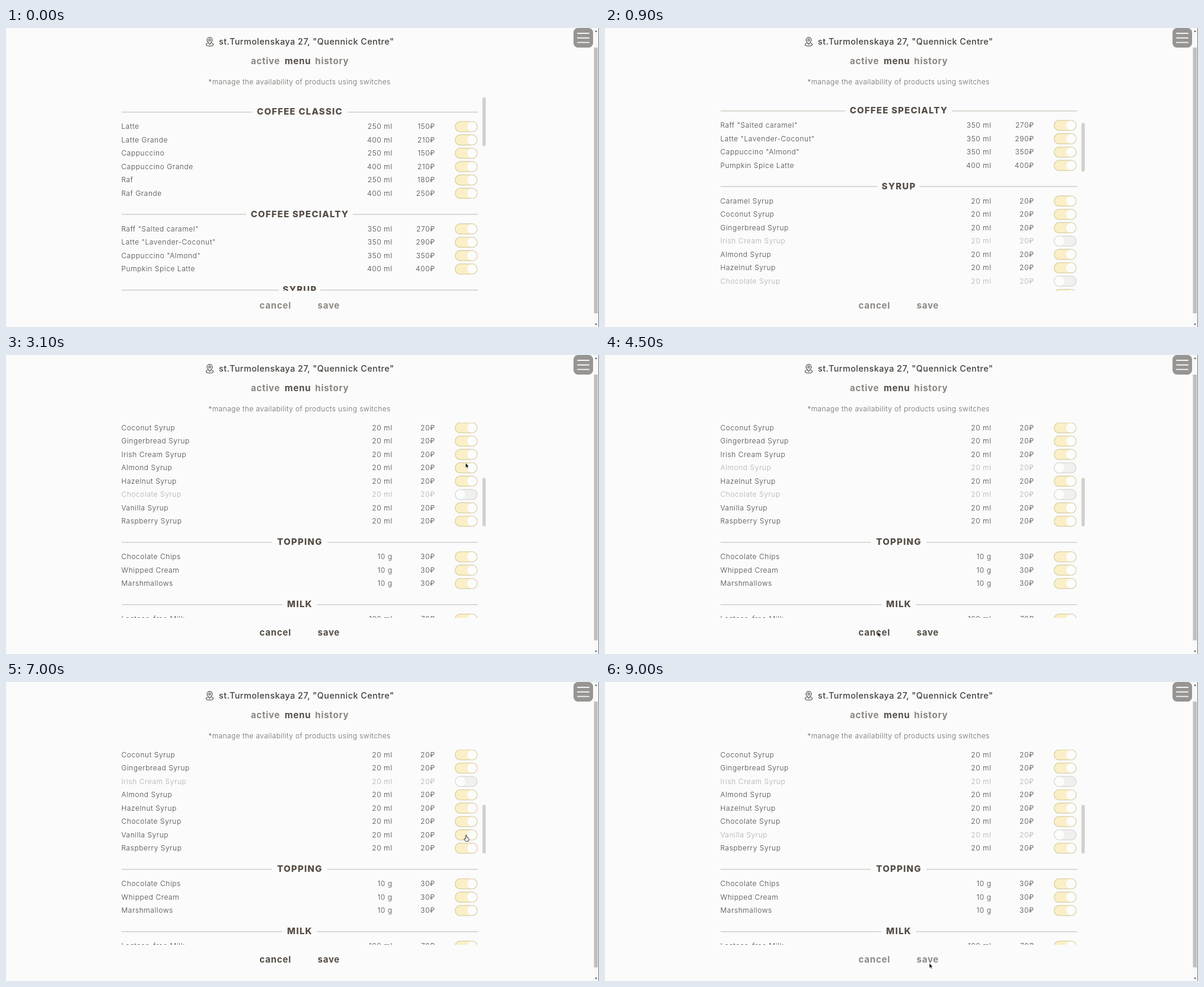
These frames come from a looping animation (1000 px wide and 504 px high, 9.3 s). An HTML page:

```html
<!DOCTYPE html>
<html lang="en">
<head>
<meta charset="utf-8">
<title>Menu availability</title>
<style>
  html, body { margin: 0; width: 100%; height: 100%; overflow: hidden; background: #fafbfa; }
  svg { display: block; width: 100vw; height: 100vh; }
  text { font-family: Inter, "Open Sans", sans-serif; fill: #4b4744; white-space: pre; }
  .row text { font-size: 12px; font-weight: 300; letter-spacing: .56px; }
  .head { font-size: 15px; font-weight: 800; letter-spacing: 1.2px; fill: #564d46; }
  .tab { font-size: 15px; font-weight: 700; letter-spacing: .75px; fill: #554d47; }
  .place { font-size: 14.3px; font-weight: 500; letter-spacing: .5px; fill: #45403c; }
  .note { font-size: 12px; font-weight: 300; letter-spacing: .41px; fill: #6f6a66; }
  .mid { text-anchor: middle; }
  .end { text-anchor: end; }
</style>
</head>
<body>
<svg viewBox="0 0 1000 504" xmlns="http://www.w3.org/2000/svg">
  <defs><clipPath id="view"><rect x="190" y="114" width="612" height="329"/></clipPath></defs>
  <rect width="1000" height="504" fill="#fafbfa"/>

  <g fill="none" stroke="#55504b" stroke-width="1.2" stroke-linejoin="round" stroke-linecap="round">
    <path d="M343.5 27.5C341 24.6 339 22.5 339 20.3a4.5 4.5 0 0 1 9 0C348 22.5 346 24.6 343.5 27.5Z"/>
    <circle cx="343.5" cy="20.3" r="1.7"/>
    <path d="M340 25.5C336 26.8 336.4 30.3 343.5 30.3S351 26.8 347 25.5"/>
  </g>
  <text class="place" x="359" y="27.7">st.Turmolenskaya 27, "Quennick Centre"</text>
  <text class="tab mid" x="437.6" y="60.7" fill-opacity=".68">active</text>
  <text class="tab mid" x="492.2" y="60.7">menu</text>
  <text class="tab mid" x="549.8" y="60.7" fill-opacity=".68">history</text>
  <text class="note mid" x="495" y="95">*manage the availability of products using switches</text>

  <g clip-path="url(#view)"><g id="list"></g></g>
  <rect id="thumb" x="803.5" width="5.5" height="82" rx="2.7" fill="#d2cfcc"/>

  <g id="buttons">
    <text class="tab mid" x="454.3" y="473.3">cancel</text>
    <text class="tab mid" x="544.3" y="473.3">save</text>
  </g>

  <rect x="957" y="0" width="33" height="33" rx="7.5" fill="#979593"/>
  <path d="M964 9H983M964 16.7H983M964 24.4H983" stroke="#f4f3f2" stroke-width="1.9" stroke-linecap="round"/>

  <rect x="991" width="9" height="504" fill="#f8f8f8"/>
  <rect x="991.5" y="33" width="6.5" height="448" fill="#c0c0c0"/>
  <path d="M999.5 0V504" stroke="#777"/>
  <path d="M993 6.500L995 4L997 6.500ZM993 498.500L995 501L997 498.500Z" fill="#444"/>

  <g id="cursor" stroke-linejoin="round">
    <path id="arrow" d="M0 0V8.200L1.900 6.500L3.200 9.300L4.500 8.700L3.300 6H5.700Z" fill="#111" stroke="#fff" stroke-width=".5"/>
    <path id="hand" d="M-.9 .5Q0 -.6 .9 .5V4L3.500 4.600Q4.600 5 4.400 6.400L3.600 10.500H-1L-3.400 7Q-3.800 5.800 -2.600 5.800L-.9 7Z" fill="#fff" stroke="#222" stroke-width=".9"/>
  </g>
</svg>
<script>
const LOOP = 9300, STEP = 100;
const $ = id => document.getElementById(id);
const clamp = v => Math.max(0, Math.min(1, v));
const mix = (a, b, u) => a + (b - a) * u;

// title, half width of the gap in the rule, rows of [name, amount, price]
const sections = [
  ["COFFEE CLASSIC", 81, [
    ["Latte", "250 ml", 150], ["Latte Grande", "400 ml", 210],
    ["Cappuccino", "250 ml", 150], ["Cappuccino Grande", "400 ml", 210],
    ["Raf", "250 ml", 180], ["Raf Grande", "400 ml", 250]]],
  ["COFFEE SPECIALTY", 90, [
    ['Raff "Salted caramel"', "350 ml", 270], ['Latte "Lavender-Coconut"', "350 ml", 290],
    ['Cappuccino "Almond"', "350 ml", 350], ["Pumpkin Spice Latte", "400 ml", 400]]],
  ["SYRUP", 35, ["Caramel", "Coconut", "Gingerbread", "Irish Cream", "Almond",
    "Hazelnut", "Chocolate", "Vanilla", "Raspberry"].map(n => [n + " Syrup", "20 ml", 20])],
  ["TOPPING", 47, ["Chocolate Chips", "Whipped Cream", "Marshmallows"].map(n => [n, "10 g", 30])],
  ["MILK", 29, [["Lactose-free Milk", "100 ml", 70]]]
];

// initial state, then the times at which it flips
const flips = {
  "Irish Cream Syrup": [0, 2800, 5200],
  "Almond Syrup": [1, 3400, 5200],
  "Chocolate Syrup": [0, 6600],
  "Vanilla Syrup": [1, 7400]
};
const unsaved = [0, 2800, 5200, 6600, 8700];

// start, end, target x, y, optional bend as fractions of the way
const moves = [
  [1700, 2400, 775, 167],
  [2800, 3100, 775, 182],
  [3300, 3500, 775, 187],
  [3800, 4600, 455, 471],
  [5400, 6200, 776, 236, .57, 1.1],
  [6700, 7000, 776, 258],
  [7500, 8300, 547, 474]
];
const entry = [1002, 320];
const handTimes = [[2400, 2900], [3400, 3900], [4600, 5300], [6200, 6700], [7000, 7500], [8300, 8800]];

function add(parent, tag, attrs, content) {
  const el = document.createElementNS("http://www.w3.org/2000/svg", tag);
  for (const k in attrs) el.setAttribute(k, attrs[k]);
  if (content) el.textContent = content;
  parent.appendChild(el);
  return el;
}

function addRow([name, amount, price], y) {
  const g = add($("list"), "g", { class: "row", transform: `translate(0 ${y})` });
  const label = add(g, "g", {});
  add(label, "text", { x: 194.5, y: 4.5 }, name);
  add(label, "text", { x: 651.5, y: 4.5, class: "end" }, amount);
  add(label, "text", { x: 723.5, y: 4.5, class: "end" }, price + "₽");
  const box = { x: 757.5, y: -7.8, width: 37, height: 17, rx: 8.5, "stroke-width": 1.3 };
  add(g, "rect", { ...box, fill: "#f0f0ef", stroke: "#d8d7d5" });
  const lit = add(g, "rect", { ...box, fill: "#faefc6", stroke: "#ddd2ab" });
  const knob = add(g, "circle", { cy: .7, r: 8, fill: "#fcfcfb" });
  return { name, label, lit, knob };
}

const rows = [];
let y = 140.5;
for (const [title, gap, items] of sections) {
  add($("list"), "path", {
    d: `M195 ${y + 1.2}H${495 - gap}M${495 + gap} ${y + 1.2}H796`, stroke: "#d3cdc8", "stroke-width": 1.6
  });
  add($("list"), "text", { x: 495.5, y: y + 5.6, class: "head mid" }, title);
  y += 25;
  for (const item of items) {
    rows.push(addRow(item, y));
    y += 22.5;
  }
  y += 12.5;
}

function level([start, ...times], t) {
  let v = start, goal = start;
  for (const at of times) {
    goal = 1 - goal;
    v = mix(v, goal, clamp((t - at + STEP) / 200));
  }
  return v;
}

function scrollAt(t) {
  const ease = u => u * u * (3 - 2 * u);
  return 174.5 * ease(clamp((t - 500) / 400)) + 191.5 * ease(clamp((t - 1100) / 400));
}

function pointerAt(t) {
  let [px, py] = entry;
  for (const [from, to, x, y, bx = .5, by = .5] of moves) {
    if (t <= from) break;
    const u = 1 - (1 - clamp((t - from) / (to - from))) ** 2;
    const bend = 2 * u * (1 - u);
    px = mix(px, x, bend * bx + u * u);
    py = mix(py, y, bend * by + u * u);
  }
  return [px, py];
}

function draw(t) {
  const scroll = scrollAt(t);
  $("list").setAttribute("transform", `translate(0 ${-scroll})`);
  $("thumb").setAttribute("y", 117 + scroll * .246);
  for (const { name, label, lit, knob } of rows) {
    const on = level(flips[name] || [1], t);
    label.setAttribute("opacity", mix(.42, 1, on));
    lit.setAttribute("opacity", on);
    knob.setAttribute("cx", mix(766.3, 785.8, on));
  }
  $("buttons").setAttribute("opacity", mix(.65, 1, level(unsaved, t)));

  const hand = handTimes.some(([from, to]) => t >= from && t < to);
  $("cursor").setAttribute("transform", `translate(${pointerAt(t)})`);
  $("cursor").setAttribute("visibility", t >= 1800 ? "visible" : "hidden");
  $("hand").setAttribute("display", hand ? "inline" : "none");
  $("arrow").setAttribute("display", hand ? "none" : "inline");
}

function tick() {
  draw(Math.floor(performance.now() % LOOP / STEP) * STEP);
  requestAnimationFrame(tick);
}
tick();
</script>
</body>
</html>
```
